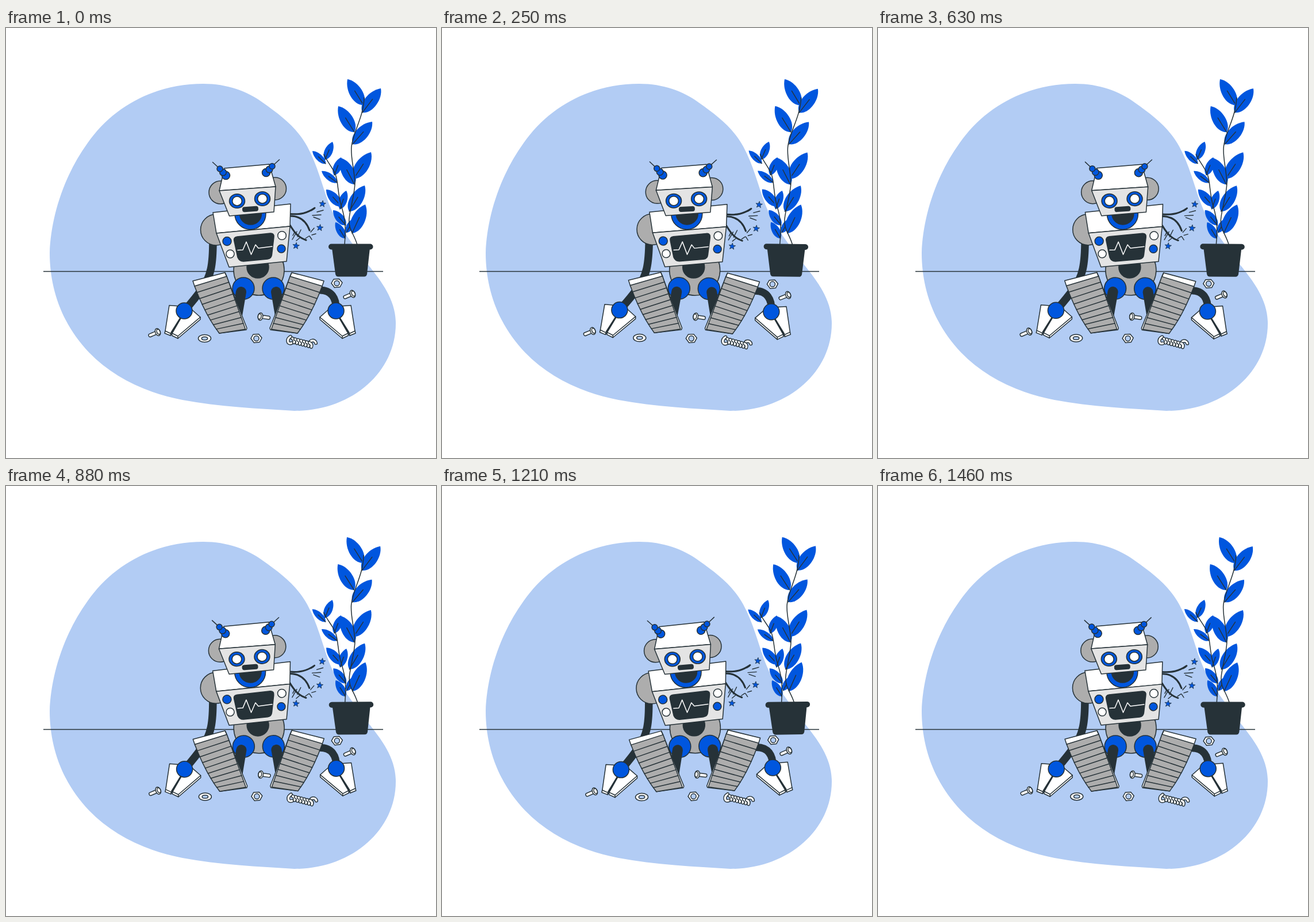
Write an HTML page that moves like this. It is 748 px wide and 748 px high and loops after 1.5 s.

```html
<!DOCTYPE html>
<html lang="en">
<head>
<meta charset="utf-8">
<title>Broken robot</title>
<style>
  html, body { margin: 0; width: 100%; height: 100%; overflow: hidden; background: #fff; }
  svg { display: block; width: 100vw; height: 100vh; }
  .o { stroke: #263238; stroke-width: 1.5; stroke-linejoin: round; stroke-linecap: round; }
</style>
</head>
<body>
<svg viewBox="0 0 748 748">
  <path fill="#b2ccf4" d="M343 97C385 97 420 110 447 130C478 152 506 173 524 206C545 245 552 285 567 318C580 347 605 378 630 412C655 443 678 474 678 514C678 600 600 666 502 666C440 662 370 659 307 647C240 634 185 606 145 565C95 513 76 450 76 391C78 330 100 258 142 200C188 134 262 97 343 97Z"/>
  <path d="M65 423.5H656" stroke="#263238" stroke-width="1.6"/>
  <g id="plant"></g>
  <g id="robot"></g>
</svg>
<script>
const BLUE = '#0056de', DARK = '#263238', GRAY = '#adadad', PALE = '#e4e4e4', WHITE = '#fff';

const path = (d, fill = 'none') => `<path class="o" d="${d}" fill="${fill}"/>`;
const poly = (pts, fill) => `<polygon class="o" points="${pts}" fill="${fill}"/>`;
const oval = (x, y, rx, ry, fill) => `<ellipse class="o" cx="${x}" cy="${y}" rx="${rx}" ry="${ry}" fill="${fill}"/>`;
const disc = (x, y, r, fill) => oval(x, y, r, r, fill);
const stroke = (d, w, color = DARK) =>
  `<path d="${d}" fill="none" stroke="${color}" stroke-width="${w}" stroke-linecap="round" stroke-linejoin="round"/>`;
const group = (transform, body) => `<g transform="${transform}">${body}</g>`;
const mirror = (axis, body) => group(`translate(${2 * axis} 0) scale(-1 1)`, body);

// Pointed leaf from its base on the stem to its tip.
function leaf([bx, by, tx, ty, w = 0.28]) {
  const dx = tx - bx, dy = ty - by;
  const at = (a, p) => `${(bx + dx * a - dy * p).toFixed(1)} ${(by + dy * a + dx * p).toFixed(1)}`;
  const d = `M${at(0, 0)}C${at(0.15, w)} ${at(0.75, w)} ${at(1, 0)}C${at(0.7, -w)} ${at(0.15, -w)} ${at(0, 0)}Z`;
  return `<path d="${d}" fill="${BLUE}"/>` + stroke(`M${at(0, 0)}L${at(0.55, 0)}`, 1.4);
}

function drawPlant() {
  const small = [
    [555, 229, 568, 198], [556, 236, 533, 214, 0.24], [571, 256, 583, 225], [576, 269, 549, 249, 0.24],
    [583, 310, 557, 281], [581, 315, 592, 283], [591, 343, 569, 317], [590, 366, 573, 338], [592, 356, 606, 331]
  ];
  const tall = [
    [622, 134, 594, 89], [620, 147, 652, 105], [606, 181, 578, 136], [603, 202, 637, 163],
    [605, 262, 635, 216], [606, 272, 582, 226], [597, 319, 624, 274], [602, 357, 625, 307]
  ];
  return small.map(leaf).join('') +
    stroke('M589 377C591 350 591 335 584 312C575 285 580 262 568 245C562 235 557 229 553 220', 1.5) +
    tall.map(leaf).join('') +
    stroke('M611 377C605 357 595 350 597 331C599 312 606 292 607 270C606 245 599 225 601 206C604 180 622 155 623 121', 1.5) +
    `<path d="M567 383H633L628 428Q627 432.500 623 432.500H578Q574 432.500 573 428Z" fill="${DARK}"/>` +
    `<rect x="561" y="375.500" width="77.500" height="10" rx="5" fill="${DARK}"/>`;
}

function foot() {
  let s = poly('325,440 381,425.500 419,522 418,525 371,531 328,449', WHITE) +
    path('M328 449L384 432L416.500 524L371 531Q347 500 328 449Z', GRAY);
  for (let i = 1; i < 9; i++) {
    const t = i / 9, u = 1 - t;
    const lx = u * u * 328 + 2 * u * t * 347 + t * t * 371;
    const ly = u * u * 449 + 2 * u * t * 500 + t * t * 531;
    s += path(`M${lx} ${ly}L${384 + 32.5 * t} ${432 + 92 * t}`);
  }
  return s + path('M381 425.500L384 432');
}

function hand() {
  return poly('284,482.500 304,484 307,502 286,535 276,531 277,527', WHITE) +
    path('M277 527L286.500 531.500L286 535') +
    poly('307,500 321,488 338,503 338,507 299,540 288.500,535 289,531', WHITE) +
    path('M289 531L299 536L338 503M299 536V540') +
    stroke('M305 502L287.500 530', 2.6) +
    disc(310, 492, 14, BLUE);
}

const bolt = (x, y, angle) => group(`translate(${x} ${y}) rotate(${angle})`,
  '<rect class="o" x="-17" y="-2.800" width="17" height="5.600" rx="2.500" fill="#fff"/>' +
  oval(0, 0, 4.3, 6.5, WHITE) + oval(1.3, 0, 2.8, 4.6, WHITE));

const nut = (x, y) => group(`translate(${x} ${y})`,
  poly('-9.500,0 -5.500,-7 4,-7.500 9.500,-1 5.500,6.500 -4,7.500', WHITE) + disc(0, 0, 4.6, '#b2ccf4'));

function spring() {
  const wire = d => stroke(d, 6.2) + stroke(d, 3.3, WHITE);
  let s = wire('M497 548C489 551 488 541 495 537') + wire('M529 550C527 542 538 542 539 548');
  for (let i = 0; i < 7; i++) {
    const x = 498 + i * 5, y = 540 + i * 1.3;
    s += wire(`M${x} ${y}Q${x + 5} ${y + 2} ${x + 3} ${y + 7}`);
  }
  return s;
}

function star(x, y) {
  const pts = Array.from({ length: 10 }, (_, i) => {
    const a = i * Math.PI / 5 - 1.45, r = i % 2 ? 2.5 : 6;
    return `${(x + r * Math.cos(a)).toFixed(1)},${(y + r * Math.sin(a)).toFixed(1)}`;
  });
  return `<polygon points="${pts.join(' ')}" fill="${BLUE}" stroke="${DARK}" stroke-width=".8"/>`;
}

const antenna = pts => path(pts.line) +
  pts.balls.map(([x, y, r]) => disc(x, y, r, BLUE)).join('');

const eye = (x, y) => oval(x, y, 13.5, 12.3, BLUE) + oval(x, y, 8.3, 8, WHITE);

function drawRobot() {
  const arms = stroke('M360 370C360 410 357 433 340 455C333 465 325 475 312 490', 13.5) +
    stroke('M546 456C566 456 575 470 574 490', 13);

  const hips = disc(440, 421, 44, GRAY) + disc(438, 416, 19, DARK) +
    disc(413, 453, 19, BLUE) + disc(465, 453, 19, BLUE) +
    stroke('M409 459L402 500', 18) + stroke('M470 459L477 500', 18);

  const wires = stroke('M494 323.500C512 325 524 322 537 313', 3) +
    stroke('M494 327C511 327 522 335 528 352', 3) +
    stroke('M494 343C502 356 509 365 522 369', 3) +
    stroke('M541 320L552 317M533 326L548 325M535 329L546 333M531 318L536 315', 1.4) +
    stroke('M530 355L536 348M532 360L539 358M528 362L532 368M521 366L527 362', 1.4) +
    stroke('M498 368L506 354M507 363L513 351M505 370L511 365M499 361L502 355', 1.4) +
    star(550.5, 306) + star(546, 347.5) + star(504.5, 379);

  const torso = disc(365.5, 351, 27, GRAY) +
    poly('360,321 495,306 494,345 366,357', WHITE) +
    poly('366,357 494,345 488,406 388,416', PALE) +
    path('M402 363L460 357Q467 357 466 364L462.500 394Q462 401 455 402L413 406Q406 406 403 399L397 371Q395 364 402 363Z', DARK) +
    stroke('M403 386.500L412 386L418 372L426.500 394L434 377L439 383L463 380', 1.5, WHITE) +
    disc(384.5, 371, 7.5, BLUE) + disc(390, 393, 7, WHITE) +
    disc(480, 361, 7.3, WHITE) + disc(479, 384, 7, BLUE) +
    disc(425, 323.5, 27, BLUE) + disc(425.5, 323, 19, DARK);

  const head = disc(373, 286, 20, GRAY) + disc(468, 279.5, 19.5, GRAY) +
    poly('380,244 458,237 469,276 371,283', WHITE) +
    poly('371,283 469,276 466,320 388.500,327', PALE) +
    eye(402, 301) + eye(446, 297) +
    group('rotate(-4 425 315)', `<rect x="411" y="310.500" width="28" height="9" rx="4" fill="${DARK}"/>`) +
    antenna({ line: 'M359.500 233.500L372 245', balls: [[382.5, 256.5, 7], [377.5, 251, 5.8], [372, 245, 5]] }) +
    antenna({ line: 'M475.500 229L463 240.500', balls: [[452.5, 251.500, 7], [458, 246, 5.8], [463, 240.5, 5]] });

  const parts = bolt(264, 529, -23) + bolt(603, 462.5, -23) + bolt(442.5, 502, 188) +
    oval(345.5, 540, 11, 6.5, WHITE) + oval(345.5, 540, 5.2, 2.8, '#b2ccf4') +
    nut(435.5, 540) + nut(575.5, 444) + spring();

  return arms + hips + wires + torso + head + parts +
    foot() + mirror(439, foot()) + hand() + mirror(442, hand());
}

const plant = document.getElementById('plant');
const robot = document.getElementById('robot');
plant.innerHTML = drawPlant();
robot.innerHTML = drawRobot();

// Linear sway: 0 -> 1 -> -1 -> 0 degrees, held at 24 poses a second.
const LOOP = 1500, POSES = 36;
const start = performance.now();

function sway(ms) {
  const pose = Math.ceil((Math.floor(ms / 10) + 1) * 6 / 25) - 1;
  const p = pose / POSES;
  return p < 0.25 ? p * 4 : p < 0.75 ? 2 - p * 4 : p * 4 - 4;
}

function draw(now) {
  const a = sway(Math.max(0, now - start) % LOOP);
  plant.setAttribute('transform', `rotate(${a} 593 261)`);
  robot.setAttribute('transform', `rotate(${a} 428 393)`);
  requestAnimationFrame(draw);
}
draw(start);
</script>
</body>
</html>
```
